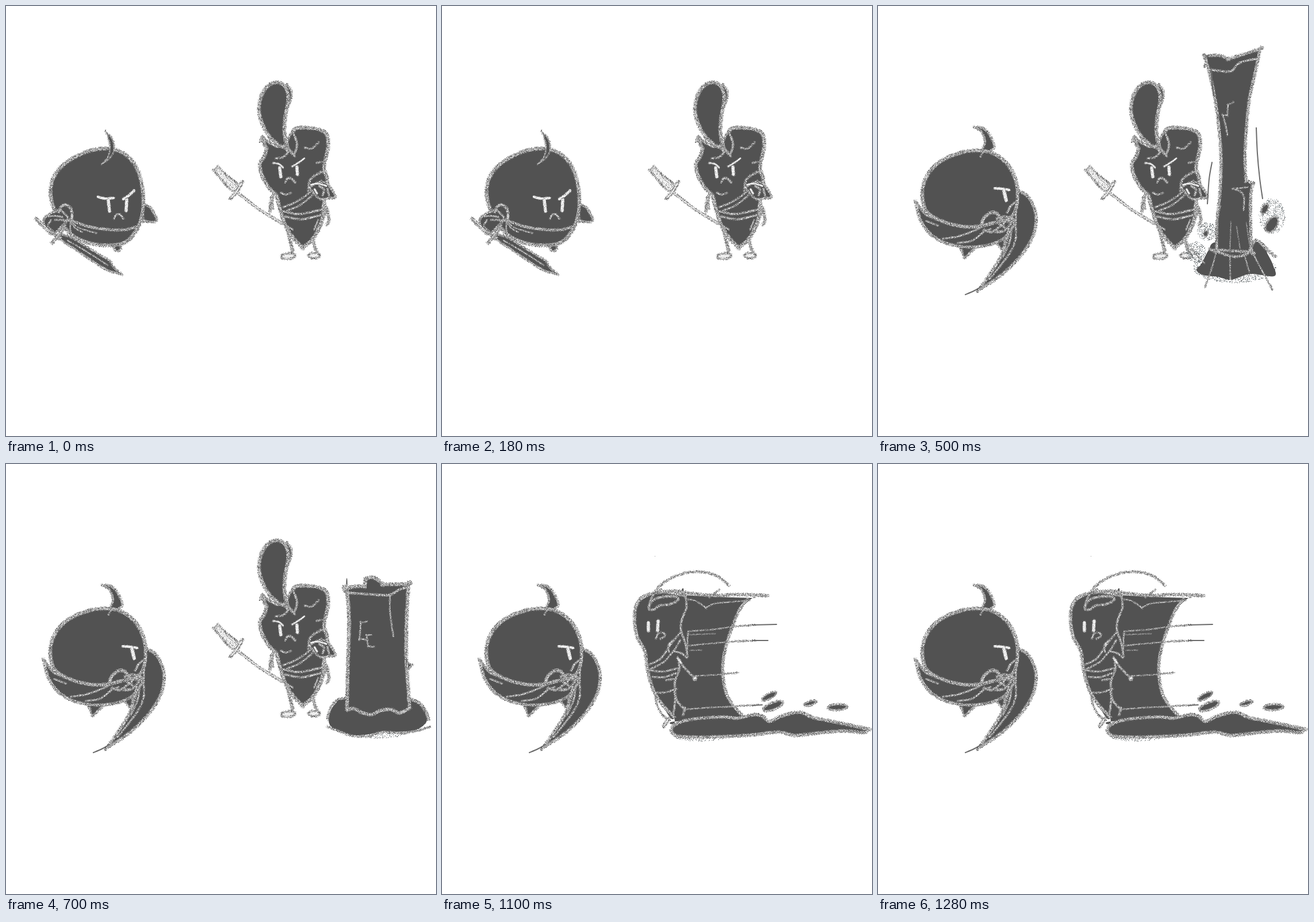
Write an HTML page with a canvas that moves like this. It is 748 px wide and 748 px high and loops after 1.4 s.

```html
<!DOCTYPE html>
<html lang="en">
<head>
<meta charset="utf-8">
<title>Sword duel</title>
<style>
html, body { margin: 0; width: 100%; height: 100%; overflow: hidden; background: #fff; }
canvas { display: block; width: 748px; height: 748px; }
</style>
</head>
<body>
<canvas id="stage" width="748" height="748"></canvas>
<script>
const ctx = document.getElementById('stage').getContext('2d');
const DARK = '#525252';

let seed = 1;
function rnd() {
  seed = (seed * 16807) % 2147483647;
  return seed / 2147483647;
}

// Chalk texture: pick() returns [grey, alpha] for one pixel
function texture(pick) {
  const c = document.createElement('canvas');
  c.width = c.height = 256;
  const g = c.getContext('2d');
  const img = g.createImageData(256, 256);
  for (let i = 0; i < img.data.length; i += 4) {
    const [v, a] = pick();
    img.data.fill(v, i, i + 3);
    img.data[i + 3] = a;
  }
  g.putImageData(img, 0, 0);
  return ctx.createPattern(c, 'repeat');
}
const grain = texture(() => [rnd() < .48 ? 85 + rnd() * 70 : 165 + rnd() * 80, 255]);
const edge = texture(() => [100 + rnd() * 50, rnd() < .42 ? 255 : 0]);
const white = texture(() => [rnd() < .14 ? 150 + rnd() * 40 : 225 + rnd() * 30, 255]);

// "x,y x,y! x,y": smooth curve through the points, "!" marks a corner
function curve(text, closed) {
  const p = [];
  for (const s of text.split(' ')) {
    const q = s.replace('!', '').split(',').map(Number);
    p.push(q);
    if (s.endsWith('!')) p.push(q);
  }
  const n = p.length;
  const at = i => closed ? p[(i + n) % n] : p[Math.max(0, Math.min(n - 1, i))];
  const path = new Path2D();
  path.moveTo(...p[0]);
  for (let i = 0; i < (closed ? n : n - 1); i++) {
    const a = at(i - 1), b = at(i), c = at(i + 1), d = at(i + 2);
    path.bezierCurveTo(b[0] + (c[0] - a[0]) / 6, b[1] + (c[1] - a[1]) / 6,
      c[0] - (d[0] - b[0]) / 6, c[1] - (d[1] - b[1]) / 6, c[0], c[1]);
  }
  if (closed) path.closePath();
  return path;
}

function ink(path, w, tex = grain) {
  ctx.strokeStyle = edge;
  ctx.lineWidth = w + 1.6;
  ctx.stroke(path);
  ctx.strokeStyle = tex;
  ctx.lineWidth = Math.max(.8, w - .8);
  ctx.stroke(path);
}
function fill(text, color = DARK) {
  ctx.fillStyle = color;
  ctx.fill(curve(text, true));
}
function shape(text, w = 6, color = DARK) {
  const path = curve(text, true);
  ctx.fillStyle = color;
  ctx.fill(path);
  ink(path, w);
}
const line = (text, w = 4) => ink(curve(text), w);
const lines = (w, ...list) => list.forEach(t => line(t, w));
const chalk = (w, ...list) => list.forEach(t => ink(curve(t), w, white));
const thin = (w, ...list) => list.forEach(t => {
  ctx.strokeStyle = '#6a6a6a';
  ctx.lineWidth = w;
  ctx.stroke(curve(t));
});
function oval(x, y, rx, ry, turn = 0, w = 4, color = DARK) {
  const path = new Path2D();
  path.ellipse(x, y, rx, ry, turn, 0, 7);
  ctx.fillStyle = color;
  ctx.fill(path);
  ink(path, w);
}
function dust(x, y, rx, ry, n) {
  for (let i = 0; i < n; i++) {
    const a = rnd() * 6.283, r = Math.sqrt(rnd());
    ctx.fillStyle = rnd() < .3 ? '#8b969a' : '#6c7072';
    ctx.fillRect(Math.round(x + Math.cos(a) * r * rx), Math.round(y + Math.sin(a) * r * ry), 1, 1);
  }
}

function ballReady() {
  shape('237,345! 249,349 257,360 262,372 254,376 239,373!', 4);
  oval(194, 421, 6, 5, 0, 4);
  shape('120,263 150,251 185,249 212,262 230,288 238,325 237,362 225,393 205,412 170,416 135,409 110,394 91,368 79,337 80,306 95,281', 6);
  shape('174,219! 184,230 188,248 182,263 168,274! 177,263 181,247 179,233', 2.5);
  chalk(5, '160,332 173,335 187,334', '204,336 213,330 223,321');
  chalk(6, '178,338 180,357', '210,337 209,356');
  line('188,370 192,363 199,363 204,370', 3.5);
  lines(5, '99,367 118,375 145,384 180,389 208,389 230,383');
  lines(2.5, '112,374 120,386 132,393', '112,374 127,386 157,395', '112,372 112,388 115,405');
  shape('94,354! 80,360 67,369 66,379 72,391 82,397 95,385 108,370', 4);
  line('92,358 96,349 104,346 113,353 114,370 102,374', 5);
  lines(3.5, '74,366 86,365 98,367', '78,373 73,383 82,392', '85,372 101,372');
  // sword
  shape('95,397! 112,402 142,420 180,443! 187,454 200,466! 178,460 150,443 120,423 93,405!', 3.5);
  line('107,408 140,427 177,451', 2.5);
  line('52,370 64,382 78,393 94,403', 6);
  line('102,382 93,397 80,412', 6);
  chalk(2, '54,371 76,391', '100,386 83,409');
}

function ballSwing() {
  shape('145,414! 148,431 154,437 160,430 160,417!', 4);
  shape('236,314! 248,319 253,322 247,331 237,338!', 4, '#e8e8e8');
  shape('120,264 150,253 180,253 204,264 221,281 232,302 237,325 237,347 231,367 218,385 212,405 200,423 170,420 142,418 113,411 94,393 83,365 80,335 83,306 98,281', 6);
  shape('174,209! 190,214 202,229 203,244 196,258 182,267 170,269! 185,257 192,242 186,223', 3.5);
  chalk(5, '187,326 200,328 212,328');
  chalk(6, '201,330 210,336 213,347');
  chalk(4, '229,301 232,311 233,321 242,323', '238,323 237,334');
  line('219,359 223,350 231,348 237,352', 4);
  line('232,365 221,376 211,380', 4);
  // blade trail
  shape('220,383! 262,376! 263,400 253,431 230,461 196,483 137,497! 163,478 185,454 203,431 213,407', 5);
  lines(3.5, '231,387 225,413 207,440 185,464 158,485', '211,400 209,420 200,431');
  thin(2, '100,502 120,500 140,496', '121,505 133,499 151,488', '213,487 234,476 253,453');
  line('216,484 235,474 251,456', 1.5);
  // belt and arms
  lines(5, '82,357 102,364 122,366 139,362', '137,413 170,421 200,424');
  lines(3.5, '83,371 97,374', '130,390 132,409 140,416');
  shape('127,383! 133,367 146,357 158,361 166,373 165,394 157,409 144,411 133,400', 5);
  lines(4.5, '133,371 148,369 160,377', '139,380 155,386 166,397', '145,362 153,374 151,390', '149,403 162,400 172,387');
  line('158,382 172,393 188,405', 7);
  line('182,381 190,403', 6);
  line('190,393 226,386 263,375', 5);
  line('188,385 215,379 260,376', 4);
  chalk(2.5, '163,383 186,402', '184,383 190,401', '150,404 163,404');
}

function ballGuard() {
  shape('143,417! 147,429 151,438 160,429 171,419!', 4);
  shape('206,410! 215,423 220,411 219,403!', 3.5);
  // blade behind the body
  shape('240,320! 259,330 271,350 275,374 269,401 254,427 229,455 202,477 176,493! 198,462 215,434 225,403 231,378', 5);
  lines(3.5, '239,382 240,402 232,425 215,449 194,475', '233,382 229,410 217,437');
  thin(2, '152,502 166,496 180,488');
  shape('66,342! 77,355 86,364 115,375 152,384 183,383 213,367 238,374 226,396 213,408 185,417 150,419 115,411 91,396 74,372', 5);
  shape('130,260 160,252 193,254 220,270 237,296 243,327 238,358 224,371 202,377 178,383 151,384 116,376 87,360 78,338 79,312 90,288 108,271', 6);
  shape('169,211! 183,213 194,224 202,245 193,253! 181,250! 186,236 180,219', 4);
  line('178,262 185,251', 3);
  chalk(5, '203,317 216,318 228,320');
  chalk(6.5, '219,321 223,338');
  lines(3.5, '84,374 104,382', '113,405 142,400 169,390 184,383', '139,412 164,408 184,393 196,388', '146,418 167,419');
  line('180,382 184,369 197,359 208,362 216,372 238,376', 6);
  lines(4.5, '184,389 198,393 213,383 225,371', '188,380 205,376 220,385', '204,393 219,391 231,379', '207,370 221,366 239,372');
  lines(4, '225,359 231,348 238,342', '228,384 224,398 215,406', '240,350 239,382');
}

function carrot() {
  // far leg and arm, sword
  lines(4, '467,322 463,337 464,352', '461,332 459,358');
  line('404,326 441,354 482,379', 4.5);
  chalk(2.5, '405,327 441,354 481,378');
  shape('361,286! 369,280! 384,294 400,307 404,315 397,322 386,315 374,301', 3, '#eee');
  chalk(6, '369,288 385,304 397,314');
  line('411,306 402,322 390,335', 5.5);
  chalk(3, '409,309 401,323 392,333');
  lines(5, '489,387 494,407 499,428', '536,394 535,411 541,429');
  oval(491, 435, 12, 5, -.1, 3.5, '#eee');
  oval(536, 434, 10, 5, 0, 3.5, '#eee');
  // body
  shape('446,231 453,247 449,263 442,274 445,293 456,314 470,329 475,347 481,367 488,385 502,406 516,420! 530,409 543,390 550,370 553,340 558,318 558,299 553,282 556,264 560,246 558,224 545,215 522,212 503,214 494,230 475,244', 6);
  line('442,236 447,227 452,242', 3.5);
  // leaves
  shape('489,138! 496,147 496,160 489,177 485,160', 3);
  shape('489,249! 472,240 456,224 444,199 440,179 445,155 456,139 470,133 483,138 490,151 490,170 486,190 484,218', 6);
  shape('501,259! 492,248 490,235 497,221 504,231 506,245', 4);
  line('483,243 492,251 502,261', 4.5);
  lines(3.5, '519,246 532,248 544,237', '469,265 482,263 491,254', '540,273 550,271', '478,325 486,328 495,325');
  chalk(3.5, '465,273 475,275 482,281', '498,279 508,273 519,265');
  chalk(6, '476,281 478,297', '506,280 507,293');
  line('486,307 490,300 496,300 503,307', 4);
  // sash, belt and near arm
  lines(3.5, '482,350 506,340 528,325 548,304', '489,356 512,346 533,329');
  lines(4, '482,357 510,362 550,354', '486,366 514,371 550,363');
  line('526,321 529,303 540,293 551,289 559,298', 4.5);
  shape('528,316! 540,308 556,307 564,316 573,332 562,334 548,336 537,328', 4);
  chalk(4, '531,311 543,309 557,313', '537,319 541,326');
  lines(4, '545,313 553,319 551,329', '559,318 562,331');
  lines(5, '553,337 556,355 550,372 541,390', '558,352 562,372 558,380');
  lines(3, '484,380 499,389', '543,372 536,389');
}

function rocks() {
  thin(2, '547,398 556,399 564,398', '559,404 566,401');
  oval(577, 385, 8, 8, 0, 3);
  chalk(3, '574,379 580,382 582,389');
  shape('576,435! 583,422! 590,418 600,419! 601,435!', 4);
  shape('600,435! 604,413! 612,391! 635,391! 643,408 653,436!', 5);
  lines(3.5, '620,394 615,411 612,424', '623,395 626,412', '631,398 641,431', '571,436 603,435 657,437');
  shape('658,397! 668,394 675,403 666,415 657,413', 4);
  shape('662,367! 669,365 675,374 663,381! 671,375', 3, '#ddd');
}

function pillarRise() {
  dust(685, 365, 23, 31, 500);
  dust(572, 392, 17, 16, 280);
  dust(553, 428, 17, 19, 320);
  dust(620, 455, 72, 26, 1700);
  thin(2, '658,212 660,257 664,300 669,335', '581,272 576,301 573,344');
  fill('590,410 575,425 563,448 554,459 566,468 590,471 615,476 648,466 689,470 688,453 678,432 663,409');
  shape('569,87! 592,86 611,92! 664,75! 657,111 646,160 641,208 638,261 640,303! 652,309! 648,330 648,380 650,428! 589,424! 590,374 595,326 597,265 592,200 583,143 575,110!', 5);
  lines(4, '575,110 595,113 615,113 629,99 661,91', '568,90 571,98 568,105');
  lines(3, '618,167 609,172! 608,190! 600,190! 605,209 608,225', '643,315 619,318! 631,323 637,334 636,355');
  thin(2.5, '580,112 581,132 584,155');
  line('577,423 590,427 606,433 623,436 643,430 654,410 662,409 673,420 691,436', 5);
  lines(2.5, '589,427 581,455 569,489', '612,434 613,475', '637,431 646,463', '653,432 669,462 686,493');
  lines(1.2, '596,348 590,375 588,403', '614,375 612,429', '624,384 631,431', '641,377 647,422');
  oval(673, 353, 5, 9, .5, 2.5);
  oval(685, 380, 9, 15, .6, 3);
  oval(570, 396, 4, 5, .3, 2);
  lines(2.5, '545,421 554,433 568,447', '536,408 543,428');
}

function pillarStand() {
  dust(645, 443, 87, 34, 1900);
  fill('592,409 574,416 563,434 563,453 580,466 610,472 655,467 706,464 728,453 732,438 718,416 700,408');
  line('592,407 577,410 566,422 559,442', 3.5);
  line('703,409 720,417 730,431 735,444', 5);
  line('559,457 578,464 599,472 628,474 654,466 690,468 718,463 737,457', 3.5);
  shape('694,343! 706,349! 697,361!', 3);
  fill('594,214! 624,212! 626,198! 645,199! 656,209! 701,209! 696,265 697,350 702,424! 681,431 660,428 637,437 613,426 594,429!');
  line('593,427 595,350 597,270 593,216! 609,213 624,213! 626,200! 637,197 646,201! 657,210! 700,209! 697,262 696,335 702,424', 6);
  line('594,428 605,425 618,432 635,436 651,429 669,427 685,433 703,424', 6);
  line('587,213 592,223 625,226 665,228 685,218 700,214', 4.5);
  lines(3, '668,229 668,257 674,300', '628,274 617,276! 615,304! 628,306!', '635,297 627,298! 630,317! 640,318!');
}

function strike() {
  dust(447, 474, 45, 8, 260);
  fill('420,228! 475,231 540,233! 520,251 505,280 493,319 488,360 495,400 508,422 526,440! 405,448! 403,390');
  line('531,235 517,254 506,280 493,319 488,358 494,398 507,421 524,439', 5);
  lines(2.5, '424,235 441,238 459,250! 473,243 502,240 535,237');
  lines(2.5, '428,291 470,288 505,283 545,280', '428,316 470,312 505,309 545,307', '436,369 470,367 515,363', '420,427 460,424 500,422 550,419');
  lines(1.2, '430,297 476,295', '430,324 452,324');
  thin(1.8, '540,280 582,279', '540,307 567,307', '540,420 557,419');
  // carrot knocked sideways
  line('370,398 374,419 383,436 396,446', 3);
  line('386,456 394,443', 6);
  chalk(3, '387,455 393,444');
  fill('361,229 385,223 424,230 421,260 416,289 424,316 412,345 409,380 403,443 382,417 367,391 358,359 353,327 340,304 335,274 339,245');
  line('424,229 386,223 354,229 339,244 335,269 340,301 353,325 357,354 366,389 383,418 404,440', 5.5);
  lines(4, '424,232 425,251 417,271 416,290 424,314 427,335', '410,336 413,355 405,380 406,407 402,440');
  line('428,291 426,334', 3);
  line('360,251 364,234 380,211 404,196 432,188 461,189 482,197 499,211', 4);
  line('371,224 405,221 441,226 475,229 515,227 566,229', 5);
  lines(3, '465,232 482,219', '372,222 381,218');
  shape('360,252 365,239 384,231 407,231 410,237 396,244 379,246 369,253', 4.5);
  chalk(6, '359,276 359,290');
  chalk(6, '376,273 375,290');
  line('372,304 376,295 384,293 388,299 380,304', 3.5);
  lines(3.5, '360,349 381,338 397,315 415,293', '362,357 386,344 403,325 414,307', '357,358 383,361 412,355', '365,370 386,371 407,364');
  lines(3.5, '395,327 394,315 403,306', '404,326 416,329 426,337', '373,398 390,397 408,391', '390,376 403,374');
  line('412,339 419,351 431,364 440,373', 4);
  chalk(4, '410,338 416,346');
  oval(440, 373, 3, 3, 0, 3, '#fff');
  lines(4, '404,397 410,414 422,426', '423,424 419,437');
  shape('404,454! 420,447 451,442 490,440 514,442 545,436 559,440 570,448 592,438 622,432 645,441 684,449 740,461! 734,467 697,464 645,469 613,472 585,466 540,471 490,474 441,475 410,473 399,464', 5.5);
  oval(569, 404, 14, 4.5, -.48, 2.5);
  oval(576, 421, 18, 6, -.38, 3.5);
  oval(641, 416, 11, 3.5, -.3, 3);
  oval(688, 423, 17, 5, -.05, 3.5);
  ctx.fillStyle = '#999';
  ctx.fillRect(370, 160, 1, 1);
}

const scenes = [
  [300, ballReady, carrot],
  [500, ballSwing, carrot, rocks],
  [700, ballGuard, carrot, pillarRise],
  [1100, ballGuard, carrot, pillarStand],
  [1400, ballGuard, strike]
];
const start = performance.now();
let shown;

function tick(now) {
  const t = Math.max(0, now - start) % 1400;
  const scene = scenes.find(s => t < s[0]);
  if (scene !== shown) {
    shown = scene;
    seed = 7;
    ctx.fillStyle = '#fff';
    ctx.fillRect(0, 0, 748, 748);
    ctx.lineCap = ctx.lineJoin = 'round';
    scene.slice(1).forEach(draw => draw());
  }
  requestAnimationFrame(tick);
}
tick(start);
</script>
</body>
</html>
```
